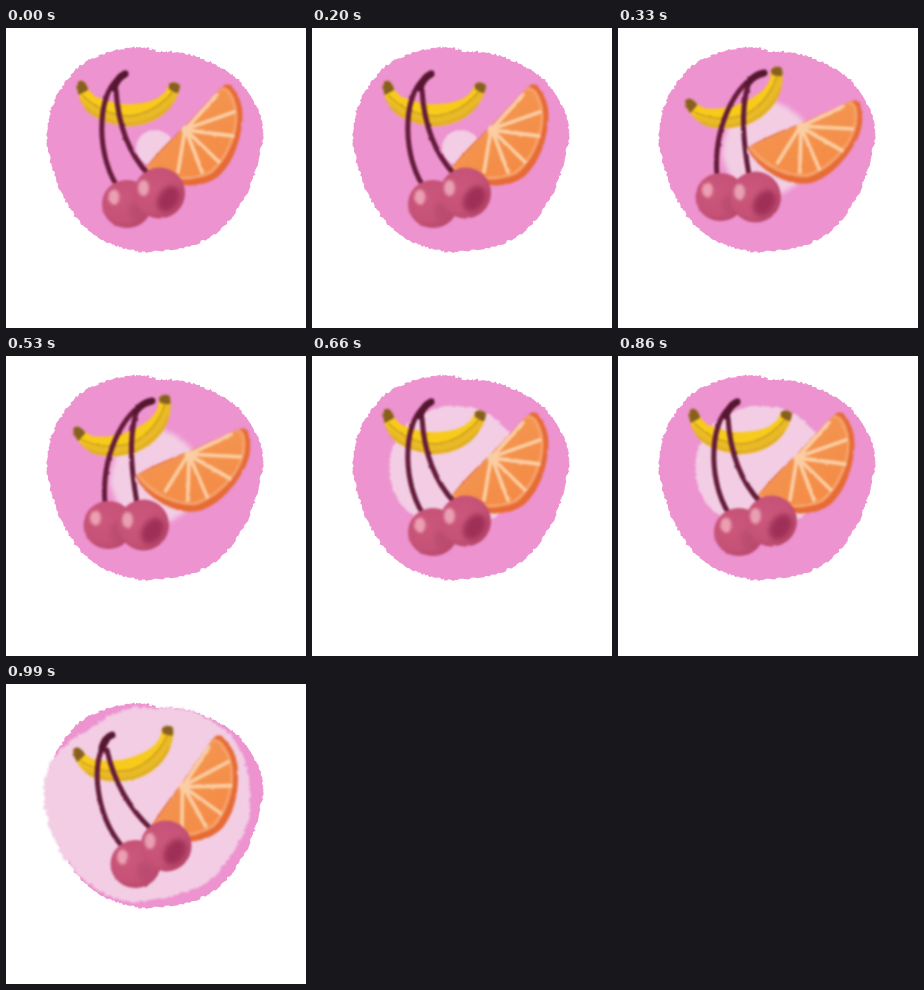
These frames come from a looping animation (300x300 px, 1320 ms). An HTML page:

```html
<!DOCTYPE html>
<html lang="en">
<head>
<meta charset="utf-8">
<title>Dancing fruit</title>
<style>
html, body { margin: 0; width: 100%; height: 100%; overflow: hidden; background: #fff; }
svg { display: block; width: 100%; height: 100%; }
</style>
</head>
<body>
<svg viewBox="0 0 300 300">
  <defs>
    <filter id="paint" x="-10%" y="-10%" width="120%" height="120%" color-interpolation-filters="sRGB">
      <feTurbulence type="fractalNoise" baseFrequency=".15" numOctaves="2" seed="4"/>
      <feDisplacementMap in="SourceGraphic" scale="2" xChannelSelector="R" yChannelSelector="G"/>
      <feGaussianBlur stdDeviation=".9"/>
    </filter>
    <filter id="haze" x="-30%" y="-30%" width="160%" height="160%"><feGaussianBlur stdDeviation="1.3"/></filter>
    <filter id="soft" x="-40%" y="-40%" width="180%" height="180%"><feGaussianBlur stdDeviation="2.6"/></filter>
    <radialGradient id="cherrySkin" cx=".42" cy=".42" r=".62">
      <stop offset="0" stop-color="#cb587c"/>
      <stop offset=".7" stop-color="#c65377"/>
      <stop offset="1" stop-color="#b9486c"/>
    </radialGradient>
    <linearGradient id="flesh" x1="0" y1="0" x2=".8" y2="1">
      <stop offset="0" stop-color="#f39c56"/>
      <stop offset="1" stop-color="#f48a45"/>
    </linearGradient>
    <clipPath id="bananaShape"><path d="M72 54Q77 50 81 58Q83 67 98 72Q122 80 145 73Q160 68 163 56Q168 52 174 57Q174 65 166 77Q153 95 127 98Q99 98 82 84Q73 74 71 60Z"/></clipPath>
  </defs>

  <path id="back" fill="#ed93d0"/>
  <path id="glow" fill="#f2cde4"/>

  <g id="banana" filter="url(#paint)">
    <g clip-path="url(#bananaShape)">
      <path fill="#f7ca1b" d="M60 40H185V110H60Z"/>
      <path fill="#e9b927" d="M73 68Q94 88 124 89Q151 86 168 63L180 66 160 105H90L65 75Z"/>
      <path fill="none" stroke="#c99a20" stroke-width="1.6" d="M76 67Q95 87 124 88Q150 85 167 63"/>
      <path fill="none" stroke="#cfa024" stroke-width="2" opacity=".5" d="M78 79Q98 96 127 96Q152 92 166 76"/>
      <path fill="#87601f" d="M66 45H81L82 62 73 67 66 62ZM162 50H180V64L170 65 163 61Z"/>
    </g>
  </g>

  <g id="orange" filter="url(#paint)">
    <path fill="#e66b35" d="M216 59Q222 53 227 60Q239 75 236 96Q232 129 213 148Q198 160 174 157Q151 154 138 142Q149 126 180 97Z"/>
    <path fill="#f5a067" d="M216 59Q223 58 228 70Q234 85 230 103Q223 131 205 146Q187 154 164 151Q148 148 139 141Z"/>
    <path fill="url(#flesh)" d="M215 62Q222 61 226 75Q231 89 226 106Q219 130 203 143Q186 151 166 147Q150 144 142 139Z"/>
    <path fill="none" stroke="#fbcda2" stroke-width="3.8" stroke-linecap="round"
      d="M180 101L211 67M180 101L228 84M180 102L227 108M180 102L213 134M180 102L196 144M179 102L172 144"/>
    <circle cx="180" cy="102" r="4.5" fill="#fbcda2"/>
  </g>

  <g id="cherries" filter="url(#paint)">
    <path id="stems" fill="none" stroke="#641b39" stroke-width="5" stroke-linecap="round"/>
    <path id="knot" fill="none" stroke="#561630" stroke-width="7" stroke-linecap="round"/>
    <g id="leftCherry">
      <ellipse rx="25" ry="24" fill="url(#cherrySkin)"/>
      <ellipse cx="10" cy="7" rx="9" ry="10" fill="#b0446a" opacity=".5" filter="url(#soft)"/>
      <ellipse cx="-13" cy="-7" rx="5.5" ry="7.5" fill="#ec9fb2" filter="url(#haze)"/>
    </g>
    <g id="rightCherry">
      <ellipse rx="25.5" ry="25.5" fill="url(#cherrySkin)"/>
      <ellipse cx="9" cy="6" rx="10" ry="14" fill="#962850" opacity=".8" transform="rotate(35 9 6)" filter="url(#soft)"/>
      <ellipse cx="-16" cy="-5" rx="5.5" ry="8" fill="#e99fb2" filter="url(#haze)"/>
    </g>
  </g>
</svg>
<script>
const STEP = 330;
const el = id => document.getElementById(id);

function randomizer(seed) {
  return () => (seed = seed * 16807 % 2147483647) / 2147483647;
}

// Closed Catmull-Rom outline with a dry-brush edge.
function brushBlob(points, seed, rough) {
  const random = randomizer(seed), n = points.length, out = [];
  const jitter = () => (random() - .5) * 2 * rough;
  points.forEach((p1, i) => {
    const p0 = points[(i + n - 1) % n], p2 = points[(i + 1) % n], p3 = points[(i + 2) % n];
    for (let k = 0; k < 20; k++) {
      const t = k / 20;
      const at = a => .5 * (2 * p1[a] + (p2[a] - p0[a]) * t
        + (2 * p0[a] - 5 * p1[a] + 4 * p2[a] - p3[a]) * t * t
        + (3 * p1[a] - p0[a] - 3 * p2[a] + p3[a]) * t * t * t);
      out.push((at(0) + jitter()).toFixed(1) + ' ' + (at(1) + jitter()).toFixed(1));
    }
  });
  return 'M' + out.join('L') + 'Z';
}

function oval(cx, cy, rx, ry) {
  return Array.from({ length: 10 }, (_, i) => {
    const a = i * Math.PI / 5;
    return [cx + rx * Math.cos(a), cy + ry * Math.sin(a)];
  });
}

const backdrop = [[100, 25], [124, 20], [140, 20], [152, 23], [176, 25], [201, 33], [229, 49], [248, 74],
  [257, 103], [252, 132], [243, 161], [222, 194], [190, 216], [145, 224], [117, 220], [90, 208],
  [64, 181], [47, 142], [41, 105], [49, 72], [72, 40]];
const fullGlow = [[84, 45], [100, 34], [124, 24], [150, 24], [178, 25], [200, 34], [220, 47], [236, 70],
  [243, 100], [243, 132], [230, 164], [206, 194], [170, 211], [130, 218], [100, 211], [70, 188],
  [50, 160], [39, 125], [39, 95], [48, 74], [64, 58]];

const glows = [
  { d: brushBlob(oval(149, 120, 19, 18), 11, .6), blur: 'haze' },
  { d: brushBlob(oval(149, 121, 44, 47), 12, 1.8), blur: 'soft' },
  { d: brushBlob(oval(143, 112, 66, 62), 13, 1.2), blur: 'haze' },
  { d: brushBlob(fullGlow, 14, 1.8), blur: 'haze' }
];

// Banana and orange: dx, dy, degrees about their own middle.
const upright = {
  banana: [0, 0, 0], orange: [0, 0, 0],
  stems: 'M117 48C92 58 88 122 111 158M110 62C112 95 122 125 143 147',
  knot: 'M119 46Q111 50 108 60',
  left: [121, 176], right: [153.5, 165]
};
const swungRight = {
  banana: [-7, 1, -21], orange: [4.5, -3, 22.5],
  stems: 'M142 46C117 56 95 100 99 148M130 57C122 85 126 118 131 147',
  knot: 'M146 45Q136 47 130 55',
  left: [102.5, 169], right: [137.5, 169]
};
const swungLeft = {
  banana: [-5.5, -1, -14.5], orange: [-3, 1, -8.6],
  stems: 'M101 57C83 78 91 132 115 161M101 66C108 98 124 125 145 145',
  knot: 'M106 51Q98 54 96 65',
  left: [129.5, 180], right: [160, 162]
};
const poses = [upright, swungRight, upright, swungLeft];

function place(id, [dx, dy, angle], cx, cy) {
  el(id).setAttribute('transform', `translate(${dx} ${dy}) rotate(${angle} ${cx} ${cy})`);
}

function draw(index) {
  const pose = poses[index], glow = glows[index];
  el('glow').setAttribute('d', glow.d);
  el('glow').setAttribute('filter', `url(#${glow.blur})`);
  place('banana', pose.banana, 122, 57.5);
  place('orange', pose.orange, 179, 98.5);
  el('stems').setAttribute('d', pose.stems);
  el('knot').setAttribute('d', pose.knot);
  el('leftCherry').setAttribute('transform', `translate(${pose.left})`);
  el('rightCherry').setAttribute('transform', `translate(${pose.right})`);
}

el('back').setAttribute('d', brushBlob(backdrop, 7, 1.2));
const start = performance.now();
let shown = 0;
draw(shown);

function tick(now) {
  const index = Math.floor(Math.max(0, now - start) / STEP) % poses.length;
  if (index !== shown) draw(shown = index);
  requestAnimationFrame(tick);
}
requestAnimationFrame(tick);
</script>
</body>
</html>
```
